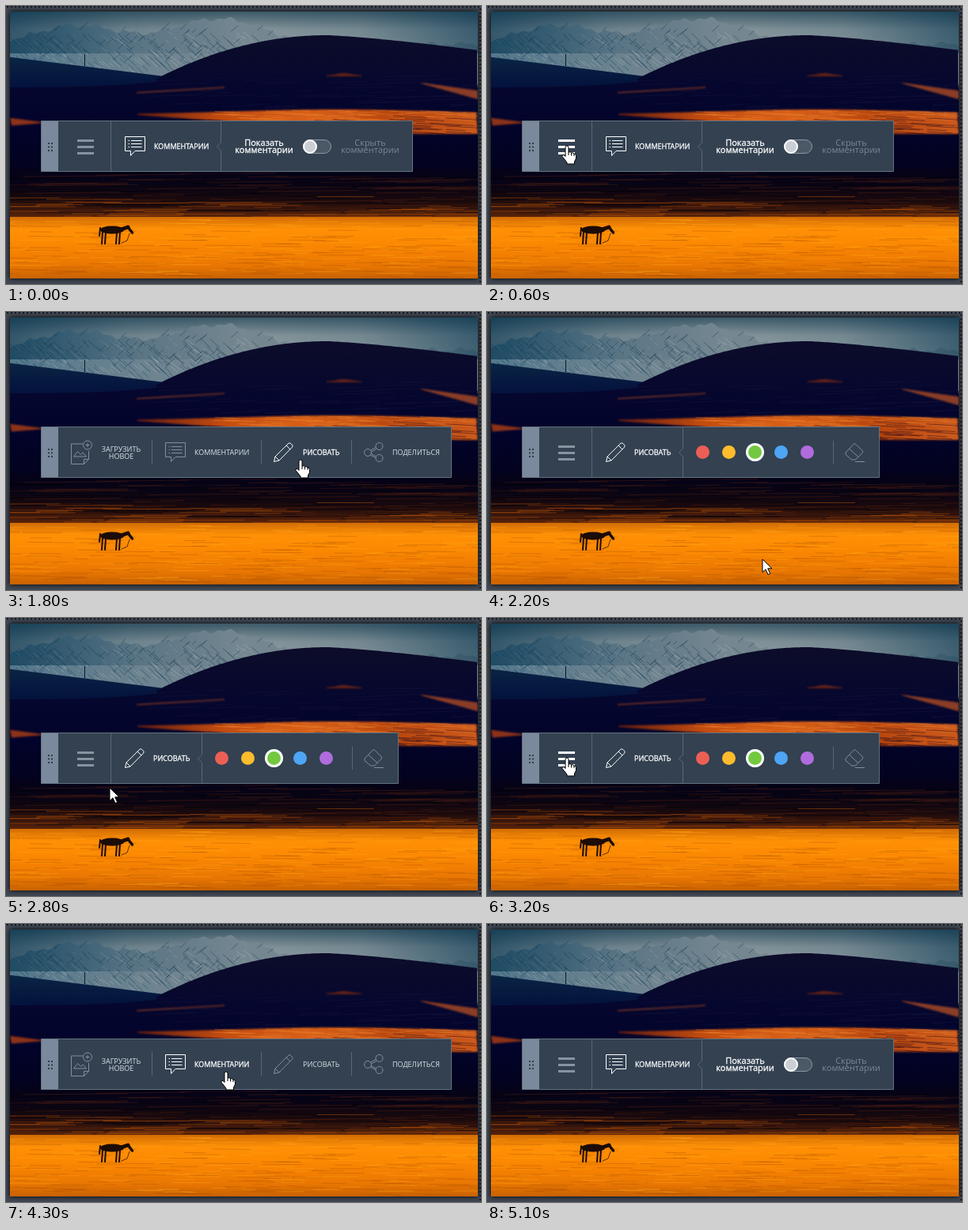
Animation of 600x352 px, one loop 5600 ms. Source, as an HTML page with a canvas:

```html
<!DOCTYPE html>
<html lang="ru">
<head>
<meta charset="utf-8">
<title>Панель инструментов</title>
<style>
html, body { margin: 0; height: 100%; overflow: hidden; background: #414853; }
canvas, svg { position: absolute; left: 0; top: 0; width: 600px; height: 352px; }
text { font: 9px "Open Sans", "Noto Sans", sans-serif; fill: currentColor; }
.big text { font-size: 11px; }
.mid { text-anchor: middle; }
.icon { fill: none; stroke: currentColor; }
.item { color: #dde3e8; }
.item .icon { color: #82909d; }
.on, .item.on, .item.on .icon { color: #fff; }
.on text { stroke: #fff; stroke-width: .3px; }
.panel { fill: #334151; stroke: #65727f; }
.rule { stroke: #5a6875; fill: none; }
.burger { color: #8793a0; stroke: currentColor; stroke-width: 3; }
.burger.on { color: #fff; }
</style>
</head>
<body>
<canvas id="photo" width="600" height="352"></canvas>
<svg viewBox="0 0 600 352">
  <defs>
    <g id="upload" class="icon"><path d="M15 4H.5v25.5h16l6-6V13M16.5 29.5v-6h6M3.5 20l5-6.5 4 4 2.5-2.5 4.5 5zM21 3v5M18.5 5.5h5"/><circle cx="21" cy="5.5" r="5.5"/></g>
    <path id="comment" class="icon" d="M.5.5h25v18H13l-5.500 6v-6h-7zM4.500 5.500H6m2 0h13.500M4.500 9.500H6m2 0h13.500M4.500 13.500H6m2 0h13.500"/>
    <path id="pencil" class="icon" d="M.5 24.500l1.500-6.500L19 1.200q1.500-1 3 .5l1.500 1.500q1.200 1.500 0 3L7 23zM2 18l5 5M16 4l5 5"/>
    <g id="share" class="icon"><circle cx="5" cy="13" r="4.500"/><circle cx="19.500" cy="5" r="4.500"/><circle cx="19.500" cy="20" r="4.500"/><path d="M8.500 10l6.500-3.500M9.300 12l6.500-3.500M9 14.500l6.500 3.300M8.500 16.300l6.500 3.300"/></g>
    <path id="eraser" class="icon" d="M1 13L11 2.500q1.500-1.500 3 0l8 8q1.500 1.500 0 3L13.500 22h-5L1 15.500zM6 8.500l11 10M13 24.500h12"/>
    <path id="bars" d="M90 170.500h21m-21 8h21m-21 8h21"/>
  </defs>

  <g id="comments">
    <path class="panel" d="M44.500 145.500h469v64h-469z"/>
    <path class="rule" d="M132.500 146v63M271.500 146v27l-5 5 5 5v26"/>
    <use href="#bars" class="burger"/>
    <g class="on"><use href="#comment" x="150" y="165"/><text x="187" y="181">КОММЕНТАРИИ</text></g>
    <g class="big mid on"><text x="326" y="177">Показать</text><text x="326" y="186">комментарии</text></g>
    <g class="big mid" color="#7b8894"><text x="460" y="177">Скрыть</text><text x="460" y="186">комментарии</text></g>
    <rect x="375.500" y="169.500" width="35" height="17" rx="8.500" fill="#4b5966" stroke="#8a97a3"/>
    <circle cx="384" cy="178" r="8" fill="#c9cfd5" stroke="#fff" stroke-width="2"/>
  </g>

  <g id="draw">
    <path class="panel" d="M44.500 145.500h451v64h-451z"/>
    <path class="rule" d="M132.500 146v63M247.500 146v27l-5 5 5 5v26M437.500 163v29"/>
    <use href="#bars" class="burger"/>
    <g class="on"><use href="#pencil" x="150" y="165"/><text x="186" y="181">РИСОВАТЬ</text></g>
    <g color="#82909d"><use href="#eraser" x="452" y="165"/></g>
  </g>

  <g id="main">
    <path class="panel" d="M44.500 145.500h518v64h-518z"/>
    <path class="rule" d="M184.500 162v30M322.500 162v30M436.500 162v30"/>
    <g class="item"><g class="icon"><use href="#upload" x="82" y="163"/></g><g class="mid"><text x="145.500" y="177">ЗАГРУЗИТЬ</text><text x="145.500" y="186">НОВОЕ</text></g></g>
    <g class="item"><g class="icon"><use href="#comment" x="201" y="165"/></g><text x="238" y="181">КОММЕНТАРИИ</text></g>
    <g class="item"><g class="icon"><use href="#pencil" x="338" y="165"/></g><text x="375" y="181">РИСОВАТЬ</text></g>
    <g class="item"><g class="icon"><use href="#share" x="452" y="165"/></g><text x="488" y="181">ПОДЕЛИТЬСЯ</text></g>
  </g>

  <path fill="#7a899c" d="M45 146h21v63H45z"/>
  <path d="M54 173v12M58 173v12" stroke="#2f3c49" stroke-width="2" stroke-dasharray="2 2.500"/>

  <g id="cursor" fill="#fff" stroke="#000" stroke-linejoin="round">
    <path id="arrow" d="M0 0v16.500l4-3.700 3 6.700 2.700-1.200-3-6.500h5.300z"/>
    <path id="hand" d="M-2 2a2 2 0 0 1 4 0V8q3-1 3.500 1 3-1 3.500 1.200 2.500-.5 2.500 2.300V16l-2 4v3H0v-2l-6-7.500q0-3 2-2l2 2zM2 8v4M5.500 9v3.500M9 10v3"/>
  </g>
</svg>
<script>
const $ = id => document.getElementById(id);
const LOOP = 5600, STEP = 100;

// --- Landscape ---
const ctx = $('photo').getContext('2d');
const LEFT = 5, TOP = 7, RIGHT = 596, BOTTOM = 345;
let seed = 7;
const rand = () => (seed = seed * 16807 % 2147483647) / 2147483647;
const bell = (x, centre, width) => Math.exp(-(((x - centre) / width) ** 2));

function blend(x0, y0, x1, y1, ...colours) {
  const g = ctx.createLinearGradient(x0, y0, x1, y1);
  colours.forEach((c, i) => g.addColorStop(i / (colours.length - 1), c));
  return g;
}

// Fills between two curves given as functions of x
function layer(x0, x1, top, bottom, fill) {
  ctx.beginPath();
  for (let x = x0; x <= x1; x += 3) ctx.lineTo(x, top(x));
  for (let x = x1; x >= x0; x -= 3) ctx.lineTo(x, bottom(x));
  ctx.fillStyle = fill;
  ctx.fill();
}

// Seeded strokes; bias > 1 gathers them at the lower end
function streaks(count, x, y, w, h, length, slope, colour, bias = 1) {
  ctx.beginPath();
  while (count--) {
    const run = length * (.3 + rand());
    const px = x + rand() * w, py = y + h * rand() ** (1 / bias);
    ctx.moveTo(px, py);
    ctx.lineTo(px + run, py + run * slope);
  }
  ctx.strokeStyle = colour;
  ctx.stroke();
}

function limb(width, ...points) {
  ctx.lineWidth = width;
  ctx.beginPath();
  for (const [x, y] of points) ctx.lineTo(x, y);
  ctx.stroke();
}

function horse() {
  ctx.strokeStyle = ctx.fillStyle = '#1c0c08';
  ctx.lineCap = ctx.lineJoin = 'round';
  ctx.beginPath();
  ctx.ellipse(134, 283.5, 15, 5, 0, 0, 7);
  ctx.fill();
  limb(5, [145, 283], [154, 280]);
  limb(3.5, [154, 280], [159.5, 287]);
  limb(2, [119, 281], [118, 291]);
  for (const x of [122, 126, 140, 144]) limb(2, [x, 286], [x - 1, 301]);
  limb(.7, [156, 288], [153, 297], [146, 300]);
}

function landscape() {
  const floor = () => BOTTOM;
  const peaks = x => 48 - 24 * bell(x, 90, 70) - 32 * bell(x, 268, 80)
    + 2 * Math.sin(x * .15) + 1.5 * Math.sin(x * .37);
  const ridge = x => 37 + (x < 405 ? 50 * ((405 - x) / 205) ** 2 : 19 * ((x - 405) / 191) ** 1.3);

  ctx.fillStyle = '#414853';
  ctx.fillRect(0, 0, 600, 352);
  ctx.strokeStyle = '#15181d';
  ctx.lineWidth = 2;
  ctx.setLineDash([2, 3]);
  ctx.strokeRect(-9, 1, 608, 400);
  ctx.setLineDash([]);
  ctx.shadowColor = '#000';
  ctx.shadowBlur = 6;
  ctx.fillRect(LEFT, TOP, RIGHT - LEFT, BOTTOM - TOP);
  ctx.shadowBlur = 0;

  ctx.beginPath();
  ctx.rect(LEFT, TOP, RIGHT - LEFT, BOTTOM - TOP);
  ctx.clip();
  ctx.lineWidth = 1;
  layer(LEFT, RIGHT, () => TOP, () => 100, blend(0, 7, 0, 52, '#3d5a68', '#84949a', '#93a0a3'));
  layer(LEFT, RIGHT, peaks, () => 100, blend(5, 0, 380, 0, '#54788c', '#6f8490', '#7a8a92'));
  streaks(110, 5, 32, 320, 50, 10, .8, '#b4bab870');
  streaks(130, 5, 34, 320, 50, 12, .9, '#16405c80');
  streaks(70, 30, 30, 310, 45, 8, -.9, '#1c405888');
  layer(LEFT, RIGHT, () => TOP, () => 60, blend(5, 0, 596, 0, '#00304ca0', '#00304c30', '#00304c00', '#00304c20', '#00304c90'));

  layer(LEFT, 230, x => 64 + .125 * x, floor, blend(0, 65, 0, 105, '#0a2444', '#03113c'));
  ctx.fillStyle = '#08182c';
  ctx.fillRect(99, 61, 1, 15);
  const night = blend(0, 40, 0, 215, '#0c0c2a', '#06072e', '#02032a', '#03021c');
  layer(190, RIGHT, ridge, floor, night);
  layer(LEFT, RIGHT, x => 103 - 14 * bell(x, 290, 120), floor, night);
  streaks(50, 150, 90, 430, 40, 50, -.03, '#14123c80');

  ctx.filter = 'blur(1px)';
  layer(165, 276, x => 109 - .06 * (x - 165), x => 110.5 - .06 * (x - 165), '#7c3220');
  layer(404, 450, x => 88 - 3 * bell(x, 427, 14), () => 89, '#602218');
  layer(524, RIGHT, x => 97 + .14 * (x - 524), x => 98 + .28 * (x - 524), '#8a3d26');
  layer(LEFT, 46, x => 141 + .13 * x, x => 152 - .08 * x, '#8c3218');
  layer(165, RIGHT, x => 137 - 6 * bell(x, 420, 180), x => 138 + 24 * Math.min(1, (x - 165) / 330),
    blend(165, 0, 596, 0, '#641c10', '#c24c10', '#d86018', '#b8460e', '#cc5a1c'));
  ctx.filter = 'none';
  streaks(60, 260, 132, 320, 12, 35, .03, '#f0883460');
  streaks(70, 250, 138, 330, 24, 45, .06, '#2c0a1880', 2);

  layer(LEFT, RIGHT, () => 205, floor, blend(0, 205, 0, 270, '#04021a', '#080414', '#1c0a0c', '#64280a'));
  streaks(70, -60, 212, 640, 52, 110, -.01, '#5a241070');
  streaks(60, -60, 212, 640, 50, 90, 0, '#02020c90');
  streaks(45, -60, 235, 640, 32, 90, 0, '#a84c0890', 3);
  layer(LEFT, RIGHT, () => 267, floor, blend(0, 267, 0, 345, '#d06c04', '#ff9006', '#fc8a02', '#f48002', '#e87602', '#c86202'));
  streaks(150, -40, 270, 630, 76, 45, .01, '#b2540068', 1.5);
  streaks(110, -40, 270, 630, 70, 45, 0, '#ffa81868');
  horse();
}
landscape();

// --- Toolbar ---
['#ec5f55', '#fcbc2c', '#72c83e', '#4ea5f5', '#b06cdc'].forEach((colour, i) => {
  const ring = i === 2 ? 'r="10" stroke="#fff" stroke-width="3"' : 'r="8.5"';
  $('draw').insertAdjacentHTML('beforeend',
    `<circle cx="${272.5 + 33 * i}" cy="177.5" fill="${colour}" ${ring}/>`);
});

const menus = [[0, 'comments'], [700, 'main'], [2000, 'draw'], [3500, 'main'], [4500, 'comments']];
const widths = { comments: 513, draw: 495, main: 562 };
const edges = [66, 184, 322, 436, 562];
const items = document.querySelectorAll('.item');
const burgers = document.querySelectorAll('.burger');
const show = (id, on) => $(id).style.display = on ? '' : 'none';

// Each leg of the pointer: start, end, where it goes
const DOOR = [357, 330], MENU = [101, 177], PENCIL = [372, 187], COMMENT = [278, 187];
const legs = [
  [0, 600, MENU], [1100, 1600, [450, 252]], [1600, 1800, PENCIL],
  [2000, 2500, [342, 304]], [2500, 3100, MENU],
  [3500, 4000, [230, 240]], [4000, 4300, COMMENT], [4500, 5000, DOOR]
];
const SAG = 50;

function pointer(t) {
  const i = legs.findLastIndex(leg => leg[0] <= t);
  const [t0, t1, to] = legs[i];
  const from = i ? legs[i - 1][2] : DOOR;
  const k = 1 - (1 - Math.min(1, (t - t0) / (t1 - t0))) ** 3;
  const [x, y] = from.map((v, axis) => v + (to[axis] - v) * k);
  return [x, y + SAG * 4 * k * (1 - k)];
}

function render(now) {
  const t = Math.floor(now % LOOP / STEP) * STEP;
  const menu = menus.findLast(m => m[0] <= t)[1];
  const visible = t >= 100 && t < 5100;
  const [x, y] = pointer(t);
  const inside = visible && y > 145 && y < 210 && x > 44 && x < widths[menu];
  const over = (x0, x1) => inside && x >= x0 && x < x1;
  for (const id in widths) show(id, id === menu);
  items.forEach((item, i) => item.classList.toggle('on', over(edges[i], edges[i + 1])));
  burgers.forEach(b => b.classList.toggle('on', over(66, 132)));
  show('cursor', visible);
  show('hand', inside);
  show('arrow', !inside);
  $('cursor').setAttribute('transform', `translate(${Math.round(x)} ${Math.round(y)})`);
}

const start = performance.now();
function tick() {
  render(performance.now() - start);
  requestAnimationFrame(tick);
}
tick();
</script>
</body>
</html>
```
